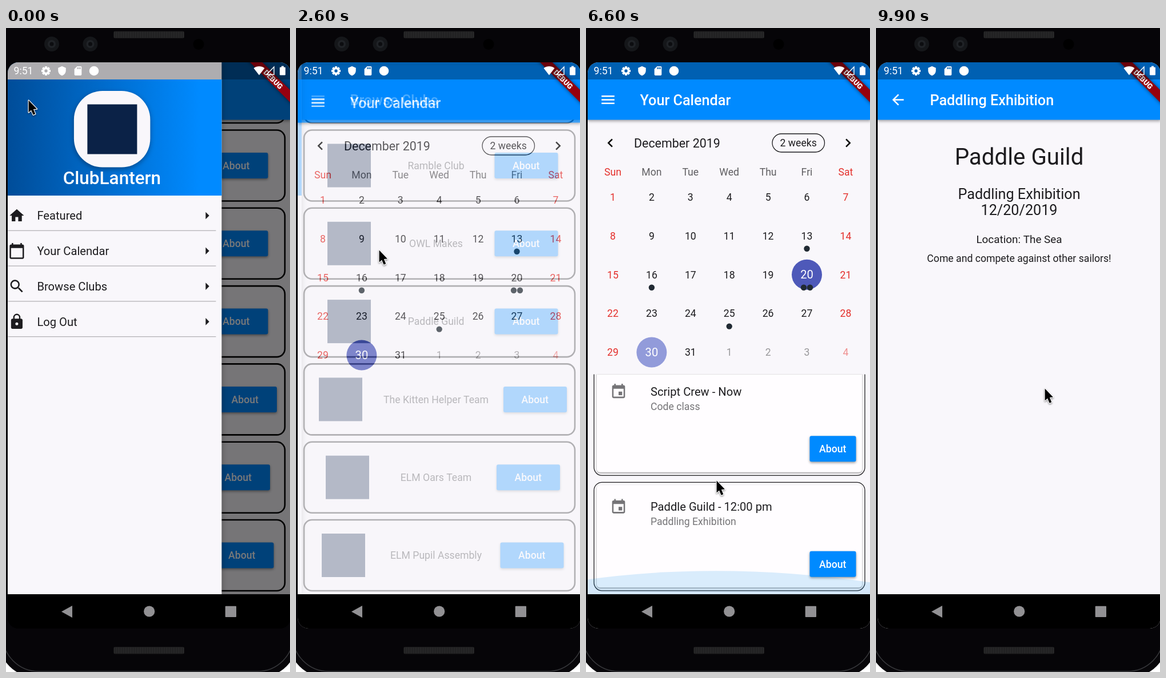
Recreate the animation shown at these times as an HTML page with a canvas. Size 497 by 1126 pixels, loop 10 s.

```html
<!DOCTYPE html>
<html lang="en">
<head>
<meta charset="utf-8">
<title>Club app walkthrough</title>
<style>
html, body { margin: 0; width: 100%; height: 100%; overflow: hidden; background: #fff; }
canvas { display: block; width: 497px; height: 1126px; }
</style>
</head>
<body>
<canvas id="stage"></canvas>
<script>
const W = 497, H = 1126, LOOP = 10000, STEP = 100;
const FONT = 'Roboto, "Noto Sans", sans-serif';
const BLUE = '#008aff', PAPER = '#f9f7fb', INK = '#1d1c1f', GREY = '#757477', NAVY = '#0b2247';
const RED = '#e4302c', PICKED = '#4e59b9', TODAY = '#929bda';
const dpr = window.devicePixelRatio || 1;

const sizeUp = c => {
  c.width = W * dpr;
  c.height = H * dpr;
  const g = c.getContext('2d');
  g.scale(dpr, dpr);
  return g;
};
const stage = sizeUp(document.getElementById('stage'));
const layer = sizeUp(document.createElement('canvas'));
let g = stage;

const ICONS = {
  home: 'M10 20v-6h4v6h5v-8h3L12 3 2 12h3v8z',
  calendar: 'M20 3h-1V1h-2v2H7V1H5v2H4c-1.1 0-2 .9-2 2v16c0 1.1.9 2 2 2h16c1.1 0 2-.9 2-2V5c0-1.1-.9-2-2-2zm0 18H4V8h16v13z',
  search: 'M15.5 14h-.79l-.28-.27A6.5 6.5 0 1 0 13.73 14.43l.27.28v.79l5 4.99L20.49 19zM9.5 14a4.5 4.5 0 1 1 0-9 4.5 4.5 0 0 1 0 9z',
  lock: 'M18 8h-1V6A5 5 0 0 0 7 6v2H6c-1.1 0-2 .9-2 2v10c0 1.1.9 2 2 2h12c1.1 0 2-.9 2-2V10c0-1.1-.9-2-2-2zM12 17a2 2 0 1 1 0-4 2 2 0 0 1 0 4zM15.1 8H8.9V6a3.1 3.1 0 0 1 6.2 0z',
  event: 'M17 12h-5v5h5zM16 1v2H8V1H6v2H5c-1.1 0-2 .9-2 2v14c0 1.1.9 2 2 2h14c1.1 0 2-.9 2-2V5c0-1.1-.9-2-2-2h-1V1zM19 19H5V8h14z',
  shield: 'M12 1L3 5v6c0 5.5 3.8 10.7 9 12 5.2-1.3 9-6.5 9-12V5z',
  sd: 'M18 2h-8L4 8v12c0 1.1.9 2 2 2h12c1.1 0 2-.9 2-2V4c0-1.1-.9-2-2-2zM12 8h-2V4h2zM15 8h-2V4h2zM18 8h-2V4h2z',
  back: 'M20 11H7.83l5.59-5.59L12 4l-8 8 8 8 1.41-1.41L7.83 13H20z',
  menu: 'M3 18h18v-2H3zM3 13h18v-2H3zM3 6v2h18V6z',
  left: 'M15.41 7.41L14 6l-6 6 6 6 1.41-1.41L10.83 12z',
  right: 'M10 6L8.59 7.41 13.17 12l-4.58 4.59L10 18l6-6z',
  caret: 'M10 17l5-5-5-5z'
};
for (const k in ICONS) ICONS[k] = new Path2D(ICONS[k]);

// Drawing helpers
function icon(name, x, y, color, size = 30.2) {
  g.save();
  g.translate(x - size / 2, y - size / 2);
  g.scale(size / 24, size / 24);
  g.fillStyle = color;
  g.fill(ICONS[name], 'evenodd');
  g.restore();
}
function text(s, x, midY, size, color = INK, align = 'left', weight = 400) {
  g.font = `${weight} ${size}px ${FONT}`;
  g.textAlign = align;
  g.fillStyle = color;
  g.fillText(s, x, midY + size * 0.355);
}
function rect(x, y, w, h, color) {
  g.fillStyle = color;
  g.fillRect(x, y, w, h);
}
function round(x, y, w, h, r, fill, stroke, line) {
  g.beginPath();
  g.roundRect(x, y, w, h, r);
  if (fill) { g.fillStyle = fill; g.fill(); }
  if (stroke) { g.strokeStyle = stroke; g.lineWidth = line; g.stroke(); }
}
function disc(x, y, r, color) {
  g.beginPath();
  g.arc(x, y, r, 0, 7);
  g.fillStyle = color;
  g.fill();
}
function poly(points, color) {
  g.beginPath();
  points.forEach(p => g.lineTo(p[0], p[1]));
  g.closePath();
  g.fillStyle = color;
  g.fill();
}
function raised(blur, dy, alpha, draw) {
  g.save();
  g.shadowColor = `rgba(0,0,0,${alpha})`;
  g.shadowBlur = blur * dpr;
  g.shadowOffsetY = dy * dpr;
  draw();
  g.restore();
}
function button(x, y, w) {
  raised(4, 2, 0.4, () => round(x, y, w, 45, 3, BLUE));
  text('About', x + w / 2 - 0.3, y + 22.6, 17.64, '#fff', 'center', 500);
}

// Timing helpers
const clamp = v => Math.max(0, Math.min(1, v));
const span = (t, a, b) => clamp((t - a) / (b - a));
const smooth = u => u * u * (3 - 2 * u);
function bezier(x1, y1, x2, y2) {
  const at = (a, b, s) => 3 * (1 - s) * (1 - s) * s * a + 3 * (1 - s) * s * s * b + s * s * s;
  return u => {
    let lo = 0, hi = 1;
    for (let i = 0; i < 24; i++) {
      const m = (lo + hi) / 2;
      if (at(x1, x2, m) < u) lo = m; else hi = m;
    }
    return at(y1, y2, hi);
  };
}
const fastOut = bezier(0.4, 0, 0.2, 1), easeIn = bezier(0.42, 0, 1, 1);

function appBar(title, lead) {
  raised(5, 2, 0.35, () => rect(3, 60, 495, 100.5, BLUE));
  icon(lead, 38.5, 125.5, '#fff');
  text(title, 94.5, 126, 25.2, '#fff', 'left', 500);
}

// Club list: name, logo centre, button left
const CLUBS = [
  ['Ramble Club', 93, 347.5], ['OWL Makes', 93, 347.5], ['Paddle Guild', 93, 347.5],
  ['The Kitten Helper Team', 78, 363], ['ELM Oars Team', 90, 351], ['ELM Pupil Assembly', 83, 357.5]
];
function clubsPage() {
  rect(3, 60, 495, 930, PAPER);
  round(14, 42, 474, 124, 14, null, '#000', 2.6);
  CLUBS.forEach(([name, logoX, btnX], i) => {
    const y = 178.5 + i * 136.3;
    round(14, y, 474, 124, 14, null, '#000', 2.6);
    rect(logoX - 38, y + 24, 76, 76, NAVY);
    text(name, 245, y + 62, 17.64, INK, 'center');
    button(btnX, y + 39.5, 111);
  });
  appBar('Browse Clubs', 'menu');
}

const MENU = [['home', 'Featured'], ['calendar', 'Your Calendar'], ['search', 'Browse Clubs'], ['lock', 'Log Out']];
function drawer(open) {
  if (open <= 0) return;
  rect(3, 60, 495, 930, `rgba(0,0,0,${0.54 * open})`);
  g.save();
  g.translate(-384 * (1 - open), 0);
  raised(10, 0, 0.35, () => rect(3, 60, 384, 930, PAPER));
  const shade = g.createLinearGradient(3, 0, 387, 0);
  shade.addColorStop(0, '#004b96');
  shade.addColorStop(0.9, BLUE);
  rect(3, 90, 384, 203, shade);
  raised(8, 3, 0.35, () => round(128.5, 110, 133.5, 133.5, 50, PAPER));
  rect(152, 133.5, 87, 87, NAVY);
  text('ClubLantern', 195, 262, 31.5, '#fff', 'center', 500);
  MENU.forEach(([ico, label], i) => {
    const y = 328 + i * 61.8;
    icon(ico, 28.5, y, INK);
    text(label, 64, y, 20.16);
    icon('caret', 361.5, y, INK);
    rect(13, y + 25.6, 364, 1.3, '#b5b3b7');
  });
  g.restore();
}

const EVENTS = { 13: 1, 16: 1, 20: 2, 25: 1 };
function monthGrid(t) {
  icon('left', 42.5, 201, '#000');
  icon('right', 458.5, 201, '#000');
  text('December 2019', 84, 201.5, 21.42);
  round(326, 185, 91.5, 32, 16, null, INK, 1.3);
  text('2 weeks', 371.7, 201, 17.64, INK, 'center');
  const tapped = t >= 4400, grow = 0.75 + 0.25 * span(t, 4350, 4550);
  for (let i = 0; i < 35; i++) {
    const col = i % 7, row = Math.floor(i / 7), x = 47 + col * 67.9, y = 295.5 + row * 67.9;
    const weekend = col === 0 || col === 6, day = i + 1, next = day > 31;
    if (!row) text('Sun Mon Tue Wed Thu Fri Sat'.split(' ')[col], x, 251.5, 17.64, weekend ? RED : '#5f5e61', 'center');
    const on = tapped ? day === 20 : day === 30, now = day === 30;
    if (on || now) disc(x, y, 26.5 * (on && tapped ? grow : 1), on ? PICKED : TODAY);
    const color = on || now ? '#fff' : next ? (weekend ? '#ef9090' : '#99989b') : weekend ? RED : INK;
    text(next ? day - 31 : day, x, y, on || now ? 20.16 : 17.64, color, 'center');
    const n = EVENTS[day] || 0;
    for (let k = 0; k < n; k++) disc(x + (k - (n - 1) / 2) * 11, y + 22.4, 5.2, '#212a33');
  }
}
function eventCard(y, title, note) {
  round(14, y, 474, 189.5, 14, '#fcfafd', INK, 1.3);
  raised(3, 1.5, 0.4, () => round(19, y + 5, 464, 179, 5, '#fffdff'));
  icon('event', 57, y + 43, GREY);
  text(title, 113, y + 43, 20.16);
  text(note, 113, y + 68.5, 17.64, GREY);
  button(391.5, y + 120.5, 81);
}
function glow(t) {
  const k = span(t, 6050, 6550) * (1 - span(t, 6600, 6900));
  if (k <= 0) return;
  const top = 990 - 41 * k, drop = 17 * k;
  g.beginPath();
  g.moveTo(3, 990);
  g.lineTo(3, top + drop * 0.9);
  g.quadraticCurveTo(240, top - drop, 498, top + drop * 1.2);
  g.lineTo(498, 990);
  g.fillStyle = `rgba(0,138,235,${0.15 * k})`;
  g.fill();
}
function calendarPage(t) {
  rect(3, 60, 495, 990, PAPER);
  monthGrid(t);
  if (t >= 4400) {
    g.save();
    g.beginPath();
    g.rect(3, 605.5, 495, 384.5);
    g.clip();
    const scroll = 19 * span(t, 5900, 6150);
    eventCard(611.8 - scroll, 'Script Crew - Now', 'Code class');
    eventCard(813.3 - scroll, 'Paddle Guild - 12:00 pm', 'Paddling Exhibition');
    glow(t);
    g.restore();
  }
  appBar('Your Calendar', 'menu');
}

function detailPage() {
  rect(3, 60, 495, 990, PAPER);
  const line = (s, y, size) => text(s, 250.5, y, size, INK, 'center');
  line('Paddle Guild', 225, 40.3);
  line('Paddling Exhibition', 290, 25.2);
  line('12/20/2019', 318.5, 25.2);
  line('Location: The Sea', 369, 18.9);
  line('Come and compete against other sailors!', 403, 17.64);
  appBar('Paddling Exhibition', 'back');
}

// New page rises by a quarter of the screen while fading in
function enter(u, page) {
  g = layer;
  g.clearRect(0, 0, W, H);
  page();
  g = stage;
  g.save();
  g.globalAlpha = easeIn(u);
  g.drawImage(layer.canvas, 0, Math.round(247 * (1 - fastOut(u))), W, H);
  g.restore();
}

function gear(x, y) {
  for (let i = 0; i < 8; i++) {
    g.save();
    g.translate(x, y);
    g.rotate(i * Math.PI / 4);
    rect(-2, -8, 4, 4, '#fff');
    g.restore();
  }
  g.beginPath();
  g.arc(x, y, 4.4, 0, 7);
  g.lineWidth = 3.4;
  g.strokeStyle = '#fff';
  g.stroke();
}
function banner() {
  g.save();
  g.translate(467.7, 89.8);
  g.rotate(Math.PI / 4);
  raised(6, 0, 0.6, () => rect(-70, -7.6, 140, 15.2, '#95000f'));
  text('DEBUG', 0, 0.2, 12.9, '#fff', 'center', 900);
  g.restore();
}
function statusBar() {
  rect(3, 60, 495, 30, 'rgba(0,0,0,.3)');
  text('9:51', 13.5, 75, 17.6, '#fff');
  gear(70, 75);
  icon('shield', 98, 75, '#fff', 18);
  icon('sd', 126, 75, '#fff', 19);
  disc(154, 75, 8.3, '#fff');
  g.beginPath();
  g.moveTo(443, 82.5);
  g.arc(443, 82.5, 15.5, -Math.PI * 0.71, -Math.PI * 0.29);
  g.fillStyle = '#fff';
  g.fill();
  g.beginPath();
  g.moveTo(456, 81.5);
  g.lineTo(469, 81.5);
  g.lineTo(469, 68);
  g.closePath();
  g.strokeStyle = '#fff';
  g.lineWidth = 1.4;
  g.stroke();
  round(479, 68.5, 10, 14, 1.2, '#fff');
  rect(482, 66.5, 4, 3, '#fff');
}

function grille(y) {
  round(188, y, 124, 12.5, 3, '#1c1c1d');
  for (let x = 190; x < 311; x += 3) rect(x, y + 1, 1.2, 10.5, '#303031');
}
function phone() {
  rect(0, 0, W, H, '#fff');
  round(-15, -45, 527, 1182, 72, '#08070a');
  round(-6, -36, 509, 1161, 63, null, '#3b3c3f', 1.4);
  round(-3, -33, 503, 1155, 60, '#060508');
  grille(5.5);
  grille(1082);
  for (const x of [80, 147.5]) {
    disc(x, 28, 13, '#15171a');
    disc(x, 28, 7, '#202327');
    disc(x, 28, 3.5, '#0c0d10');
  }
  disc(337, 28.5, 9.5, '#000');
  round(3, 60, 495, 990, 19, '#000');
}
function navBar() {
  rect(3, 990, 495, 60, '#000');
  const c = '#929194';
  poly([[97, 1020.5], [116, 1010], [116, 1031]], c);
  disc(250.7, 1020, 9.6, c);
  round(383.7, 1010.7, 19.3, 19.3, 1, c);
}

const PATH = [
  [0, 39, 125], [200, 41, 128], [1300, 142, 348], [2100, 145, 387], [3300, 145, 387],
  [4200, 386, 433], [4700, 386, 433], [5100, 368, 532], [5800, 231, 948], [5900, 231, 948],
  [6600, 228, 790], [6900, 228, 788], [7800, 418, 937], [8000, 420, 927], [9500, 420, 927], [9900, 295, 629]
];
const ARROW = [[0, 0], [0, 21], [4.5, 16.8], [8, 25.2], [11.7, 23.7], [8.3, 15.5], [14.4, 15]];
function cursor(t) {
  let i = 1;
  while (i < PATH.length - 1 && PATH[i][0] < t) i++;
  const [t0, x0, y0] = PATH[i - 1], [t1, x1, y1] = PATH[i];
  const u = smooth(span(t, t0, t1));
  g.save();
  g.translate(x0 + (x1 - x0) * u + 0.6, y0 + (y1 - y0) * u + 1.6);
  raised(3, 1.5, 0.35, () => {
    poly(ARROW, '#000');
    g.strokeStyle = '#fff';
    g.lineWidth = 2.4;
    g.lineJoin = 'round';
    g.stroke();
  });
  poly(ARROW, '#000');
  g.restore();
}

function draw(t) {
  phone();
  g.save();
  g.beginPath();
  g.roundRect(3, 60, 495, 990, 19);
  g.clip();
  const toCalendar = span(t, 2355, 2655), toDetail = span(t, 8110, 8410);
  if (toCalendar < 1) {
    clubsPage();
    const close = span(t, 2340, 2640);
    drawer(t < 100 ? 0.975 : (1 - close) * (1 - close));
    if (toCalendar > 0) enter(toCalendar, () => calendarPage(t));
  } else if (toDetail < 1) {
    calendarPage(t);
    if (toDetail > 0) enter(toDetail, detailPage);
  } else {
    detailPage();
  }
  banner();
  statusBar();
  navBar();
  g.restore();
  cursor(t);
}

const start = performance.now();
function tick() {
  const t = (performance.now() - start) % LOOP;
  draw(Math.floor(t / STEP) * STEP);
  requestAnimationFrame(tick);
}
tick();
</script>
</body>
</html>
```
